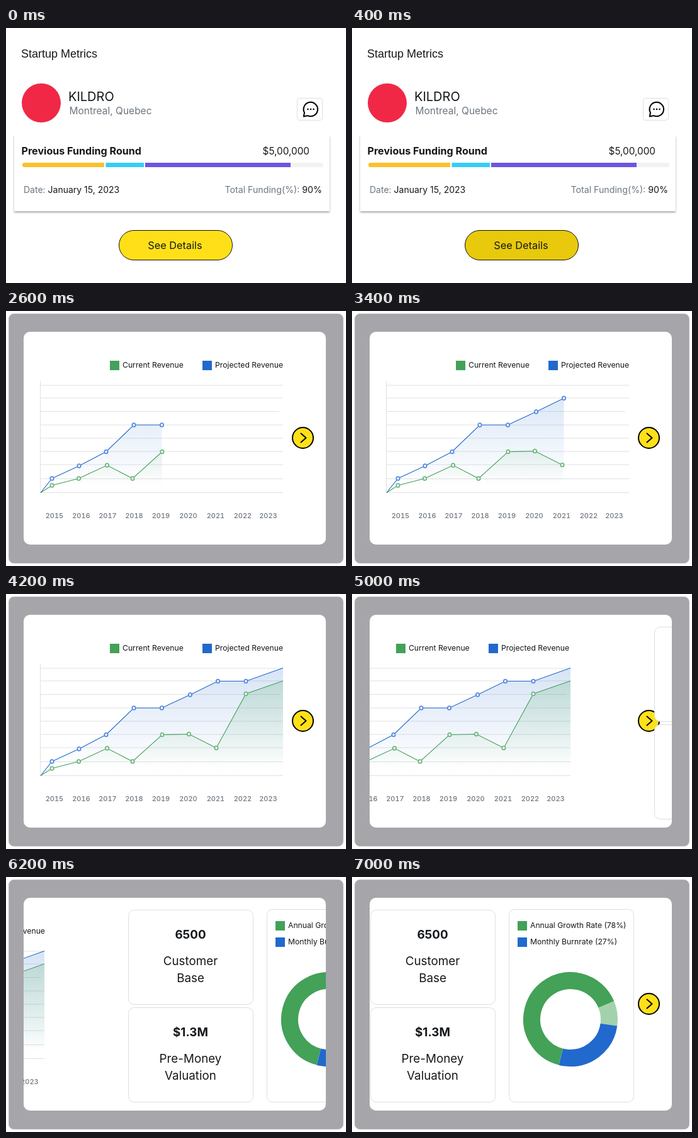
An HTML page that plays this animation: 540 by 405 pixels, repeating every 7400 ms.

```html
<!DOCTYPE html>
<html lang="en">
<head>
<meta charset="utf-8">
<title>Startup Metrics</title>
<style>
  html, body { margin: 0; height: 100%; overflow: hidden; background: #fff; }
  svg { display: block; width: 100%; height: 100%; font-family: Inter, sans-serif; fill: #15181b; }
  .muted { fill: #6c757f; }
  .bold { font-weight: 700; }
  .mid { text-anchor: middle; }
  .end { text-anchor: end; }
  .small { font-size: 12.2px; }
  .years { font-size: 11px; font-weight: 500; font-variant-numeric: tabular-nums; }
  .big { font-size: 18.8px; text-anchor: middle; }
  .card { fill: #fff; stroke: #dedede; }
  .grid { stroke: #e0e1e3; fill: none; }
  .funding { fill: #fff; filter: drop-shadow(0 2.5px 1.5px rgba(0, 0, 0, .35)); }
  .line { fill: none; stroke-width: 1.1; }
  .ink { fill: none; stroke: #000; stroke-width: 2; stroke-linecap: round; stroke-linejoin: round; }
</style>
</head>
<body>
<svg viewBox="0 0 540 405">
  <defs>
    <clipPath id="panel"><rect x="28" y="33" width="480" height="338" rx="10"/></clipPath>
    <linearGradient id="blueFade" gradientUnits="userSpaceOnUse" x1="0" y1="118" x2="0" y2="275">
      <stop stop-color="#2169cc" stop-opacity=".18"/><stop offset="1" stop-color="#2169cc" stop-opacity="0"/>
    </linearGradient>
    <linearGradient id="greenFade" gradientUnits="userSpaceOnUse" x1="0" y1="138" x2="0" y2="280">
      <stop stop-color="#43a158" stop-opacity=".2"/><stop offset="1" stop-color="#43a158" stop-opacity="0"/>
    </linearGradient>
  </defs>

  <g id="summary">
    <text x="24" y="47" font-size="18" style="font-family:'Liberation Sans',sans-serif">Startup Metrics</text>
    <circle cx="56" cy="119" r="31" fill="#f02846"/>
    <text x="99" y="116" font-size="20">KILDRO</text>
    <text x="100.500" y="137" font-size="15.500" class="muted">Montreal, Quebec</text>
    <rect x="462.500" y="111.500" width="40" height="35" rx="4" class="card"/>
    <path class="ink" d="M474 134.500A11.200 11.200 0 1 1 479 139.200L472.800 140.500Z"/>
    <g fill="#000"><circle cx="479.500" cy="129" r="1.300"/><circle cx="484" cy="129" r="1.300"/><circle cx="488.500" cy="129" r="1.300"/></g>

    <rect x="13" y="170" width="501" height="121" class="funding"/>
    <rect y="164" width="540" height="8" fill="#fff"/>
    <text x="24.500" y="201" font-size="16.100" class="bold">Previous Funding Round</text>
    <text x="482" y="201" font-size="15.300" class="end">$5,00,000</text>
    <rect x="26" y="214" width="478" height="7" rx="3.500" fill="#f2f2f3"/>
    <path d="M156 214H29.500a3.500 3.500 0 0 0 0 7H156Z" fill="#fcc02c"/>
    <rect x="156" y="214" width="296" height="7" fill="#fff"/>
    <rect x="158.500" y="214" width="60.500" height="7" fill="#36cdf6"/>
    <rect x="221" y="214" width="231" height="7" fill="#6c55e3"/>
    <text x="28" y="262" font-size="14"><tspan class="muted">Date:</tspan> January 15, 2023</text>
    <text x="502" y="262" font-size="14.200" class="end"><tspan class="muted">Total Funding(%):</tspan> 90%</text>
    <rect id="details" x="179.500" y="321.500" width="180" height="47" rx="23.500" stroke="#111"/>
    <text x="268.500" y="351" font-size="16.300" class="mid">See Details</text>
  </g>

  <g id="report">
    <rect x="4.500" y="4.500" width="531" height="396" rx="8" fill="#a6a6aa" stroke="#bcbcbf"/>
    <rect x="28" y="33" width="480" height="338" rx="10" fill="#fff"/>
    <g clip-path="url(#panel)">
      <g id="chartLegend"></g>
      <g id="chart"></g>
      <circle id="next" cx="471.500" cy="201.500" r="16.500" stroke="#000" stroke-width="2"/>
      <path class="ink" d="M468.500 194.500l8 7-8 7"/>
      <g id="cards"></g>
    </g>
  </g>
</svg>

<script>
const BLUE = '#2169cc', GREEN = '#43a158', YELLOW = '#ffe018', PRESSED = '#e8c90c';
const LOOP = 7400, STEP = 400, CHART_AT = 1000, SLIDE_AT = 4600, TRAVEL = 547;
const offsets = [0, 96, 191, 287, 382, 517, TRAVEL];
const $ = id => document.getElementById(id);

const series = [
  { color: BLUE, ring: '#5a8de0', fade: 'blueFade',
    points: [[55, 288.5], [73, 266], [116, 246], [159, 223.5], [203, 181], [247.5, 181], [292.5, 160], [336.5, 138.5], [381, 138.5], [440, 117.5]] },
  { color: GREEN, ring: '#70b981', fade: 'greenFade',
    points: [[55, 288.5], [73, 277], [115.5, 266], [160.5, 245], [201, 266], [248, 223.5], [290.5, 222.5], [334, 244.5], [381, 158.5], [440, 138]] }
];

const legend = (x, y, color, label) =>
  `<rect x="${x}" y="${y}" width="15" height="15" fill="${color}"/>
   <text x="${x + 20}" y="${y + 11}" class="small">${label}</text>`;

const card = (x, y, w, h) => `<rect x="${x}" y="${y}" width="${w}" height="${h}" rx="9" class="card"/>`;

const stat = (y, value, ...lines) => card(29.5, y, 198, 150) +
  `<text x="128" y="${y + 45.5}" class="big bold">${value}</text>` +
  lines.map((s, i) => `<text x="128" y="${y + 87 + 27 * i}" class="big">${s}</text>`).join('');

// Angles in degrees, clockwise from three o'clock
const arc = (color, from, to) =>
  `<circle cx="347" cy="226" r="61.5" fill="none" stroke="${color}" stroke-width="27" pathLength="360"
    stroke-dasharray="${to - from} ${360 - to + from}" transform="rotate(${from} 347 226)"/>`;

const gridLines = [118, 138, 159.5, 181, 202, 223, 244, 266.5, 288.5]
  .map(y => `M54 ${y}H${y === 159.5 ? 434 : 440}`).join('');
const years = [77, 119.5, 161.5, 203.5, 246, 289.5, 333, 376, 416.5]
  .map((x, i) => `<text x="${x}" y="328.5" class="years muted mid">${2015 + i}</text>`).join('');

function plot({ color, ring, fade, points }, count) {
  const shown = points.slice(0, count + 1);
  const path = 'M' + shown.join('L');
  const dots = shown.slice(1, 9).map(([x, y]) =>
    `<ellipse cx="${x}" cy="${y}" rx="2.6" ry="2.9" fill="#fff" stroke="${ring}" stroke-width="1.9"/>`).join('');
  return `<path d="${path}V288.5Z" fill="url(#${fade})"/>
    <path d="${path}" class="line" stroke="${color}"/>${dots}`;
}

$('chartLegend').innerHTML = legend(165, 79, GREEN, 'Current Revenue') + legend(312, 79, BLUE, 'Projected Revenue');
$('cards').innerHTML =
  stat(52.5, '6500', 'Customer', 'Base') +
  stat(207.5, '$1.3M', 'Pre-Money', 'Valuation') +
  card(249.5, 51.5, 198, 306) +
  legend(263, 70, GREEN, 'Annual Growth Rate (78%)') +
  legend(263, 96, BLUE, 'Monthly Burnrate (27%)') +
  arc(GREEN, 104.5, 337.5) + arc('#a3d1ac', -22.5, 8) + arc(BLUE, 8, 104.5);

let drawn = -1;
function drawChart(count) {
  if (count === drawn) return;
  drawn = count;
  $('chart').innerHTML = `<path class="grid" d="M54.5 111V288.5${gridLines}"/>` +
    years + series.map(s => plot(s, count)).join('');
}

const shift = (id, x) => $(id).setAttribute('transform', `translate(${x} 0)`);

function render(t) {
  const reporting = t >= CHART_AT;
  $('summary').style.display = reporting ? 'none' : '';
  $('report').style.display = reporting ? '' : 'none';
  $('details').setAttribute('fill', t >= 400 ? PRESSED : YELLOW);
  if (!reporting) return;

  drawChart(Math.min(9, 1 + Math.floor((t - CHART_AT) / STEP)));
  const sliding = t >= SLIDE_AT;
  const step = Math.floor((t - SLIDE_AT) / STEP);
  const offset = sliding ? offsets[step] : 0;
  $('next').setAttribute('fill', step === 0 ? PRESSED : YELLOW);
  shift('chartLegend', -offset * 0.99);
  shift('chart', sliding ? 3 - offset : 0);
  shift('cards', TRAVEL - offset);
}

function tick() {
  render(performance.now() % LOOP);
  requestAnimationFrame(tick);
}
tick();
</script>
</body>
</html>
```
